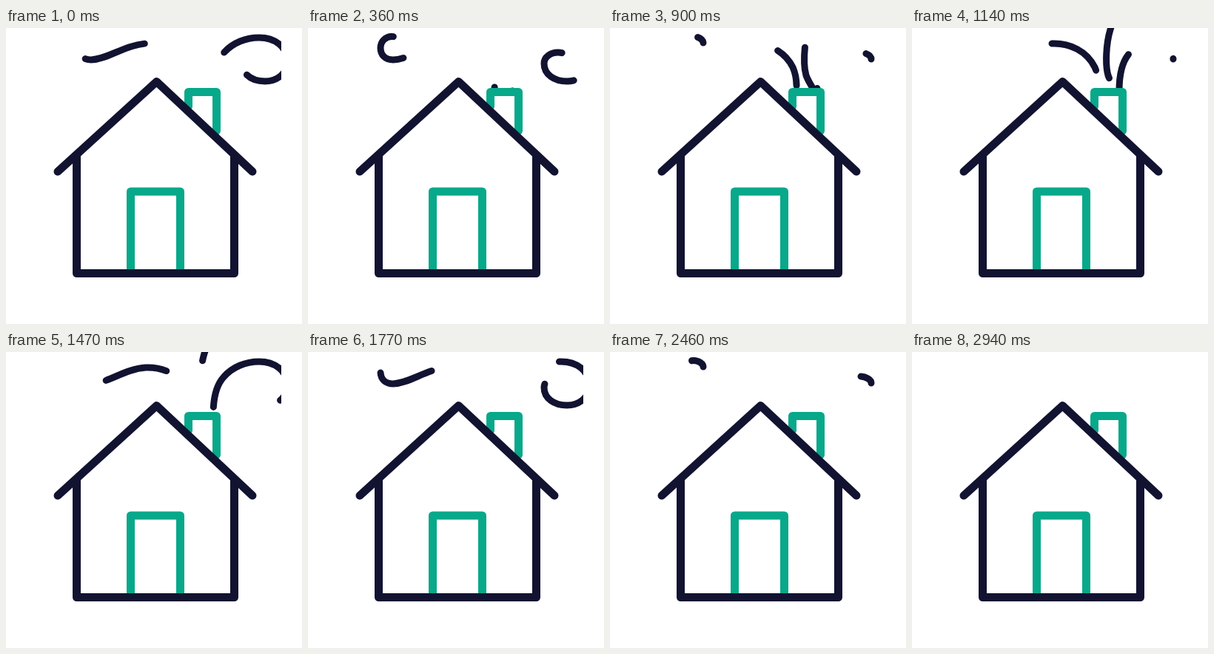
An HTML page that plays this animation: 400 px wide and 400 px high, repeating every 3.69 s.

```html
<!DOCTYPE html>
<html lang="en">
<head>
<meta charset="utf-8">
<title>House with smoke</title>
<style>
  html, body { margin: 0; width: 100%; height: 100%; overflow: hidden; background: #fff; }
  svg { display: block; width: 100vw; height: 100vh; }
</style>
</head>
<body>
<svg viewBox="0 0 400 400" fill="none" stroke="#121331" stroke-width="11" stroke-linecap="round" stroke-linejoin="round">
  <clipPath id="view"><rect width="372" height="400"/></clipPath>
  <g id="smoke" stroke-width="9" clip-path="url(#view)"></g>
  <g stroke="#08a88a">
    <path d="M246.5 106V86.5H284.5V139" fill="#fff"/>
    <path d="M168.5 326V221H235.5V326"/>
  </g>
  <path d="M95.5 173V331.5H308.5V173"/>
  <path d="M70 194L203.5 72.5L333 194"/>
</svg>
<script>
const LOOP = 3690, STEP = 30;
const PUFF_GAP = 1650, PUFF_LIFE = 2940, TAIL_DELAY = 500;

const smooth = [1 / 3, 2 / 3];
const wisps = [
  { start: 200, duration: 2130, ease: smooth,
    d: "M252 84C252.5 72 251 62 247 53C236 31 213 20 189 21C160 23 138 42 115 43C104 43 98 36 98 27C98 18 105 11.5 113 11.5C120 11.5 126 16 126 20" },
  { start: 340, duration: 2130, ease: smooth,
    d: "M276 85C271 76 267 70 265 64C261 50 262 22 268 2L355 -259" },
  { start: 800, duration: 1630, ease: [.355, .245],
    d: "M280 85C280 60 285 44 294 34C306 20 324 13 342 13C363 13 380 25 380 45C380 62 366 72 350 72C333 72 319 63 319 48C319 39 328 33 338 33C345 33 353 37 353 42" }
];

// Cubic easing with handles (x1, 0) and (x2, 1)
function ease(x, [x1, x2]) {
  if (x <= 0) return 0;
  if (x >= 1) return 1;
  let low = 0, high = 1;
  for (let i = 0; i < 24; i++) {
    const s = (low + high) / 2, r = 1 - s;
    if (3 * r * r * s * x1 + 3 * r * s * s * x2 + s ** 3 < x) low = s;
    else high = s;
  }
  return low * low * (3 - 2 * low);
}

const smoke = document.getElementById("smoke");
const puffs = [PUFF_GAP, 0].flatMap(age => wisps.map(wisp => {
  const path = document.createElementNS("http://www.w3.org/2000/svg", "path");
  path.setAttribute("d", wisp.d);
  smoke.append(path);
  return { ...wisp, age, path, length: path.getTotalLength() };
}));

function render(time) {
  for (const { age, path, length, start, duration, ease: curve } of puffs) {
    const t = time + age;
    const travel = at => length * ease((at - start) / duration, curve);
    const head = travel(t), tail = travel(t - TAIL_DELAY);
    const visible = head > 0 && t < PUFF_LIFE;
    path.setAttribute("visibility", visible ? "visible" : "hidden");
    // A tiny minimum keeps the round dot at the end of the wisp
    const from = Math.min(tail, length - .1);
    path.setAttribute("stroke-dasharray", `${Math.max(head - from, .1)} 9999`);
    path.setAttribute("stroke-dashoffset", -from);
  }
}

const origin = performance.now();
function tick() {
  const time = (performance.now() - origin) % LOOP;
  render(Math.floor(time / STEP) * STEP);
  requestAnimationFrame(tick);
}
tick();
</script>
</body>
</html>
```
